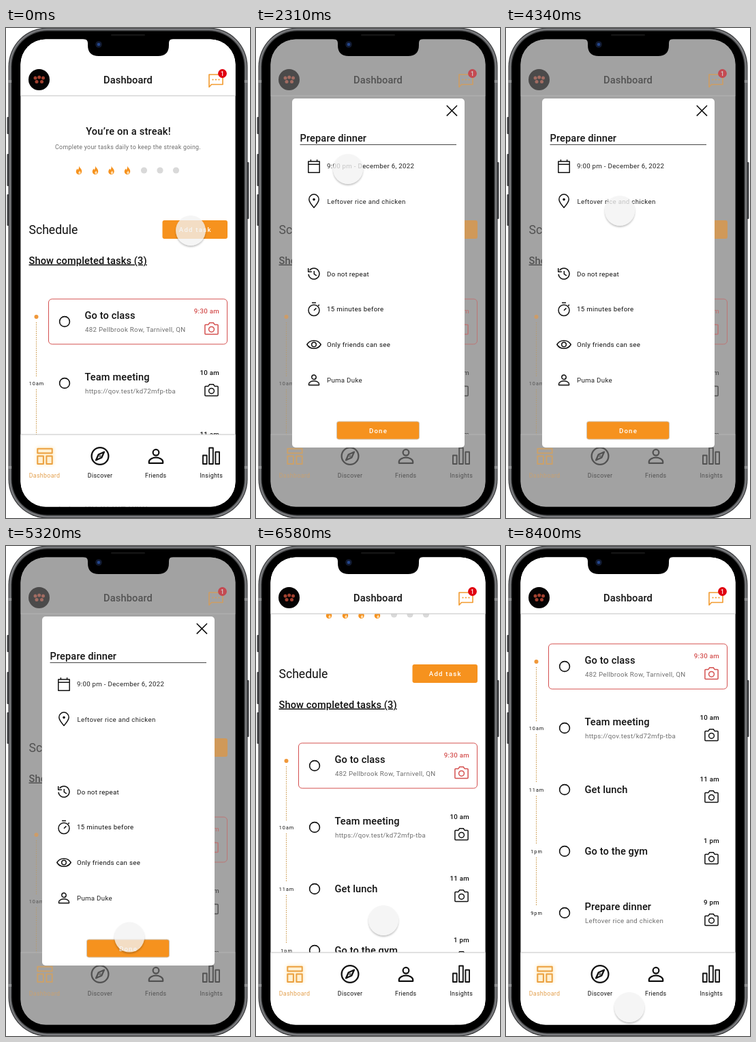
Write an HTML page that moves like this. It is 358x716 px and loops after 8470 ms.

```html
<!DOCTYPE html>
<html lang="en">
<head>
<meta charset="utf-8">
<title>Task planner</title>
<style>
  html, body { margin: 0; width: 100%; height: 100%; overflow: hidden; background: #fff; }
  svg { position: absolute; left: 0; top: 0; display: block; font-family: Roboto, sans-serif; }
  .paper { fill: #fff; }
  .dim .paper { fill: #a3a3a3; }
  .dim #ui { opacity: .55; }
  .dim .glow { display: none; }
  #touch {
    position: absolute; left: -22px; top: -22px; width: 44px; height: 44px; border-radius: 50%;
    background: rgba(242, 242, 242, .78); box-shadow: 0 2px 2.5px rgba(0, 0, 0, .23);
  }
</style>
</head>
<body>
<svg id="stage" width="358" height="716" viewBox="0 0 358 716"></svg>
<div id="touch"></div>
<script>
const LOOP = 8470, STEP = 70;
const ORANGE = '#f6921e', RED = '#d4504f', INK = '#111', GREY = '#6e6e6e';

// ---- drawing helpers ----
const text = (x, y, size, str, o = {}) =>
  `<text x="${x}" y="${y}" font-size="${size}" font-weight="${o.w || 400}" fill="${o.c || INK}" ` +
  `letter-spacing="${o.ls || 0}" text-anchor="${o.a || 'start'}"${o.u ? ' text-decoration="underline"' : ''}>${str}</text>`;
const rect = (x, y, w, h, r, fill, more = '') =>
  `<rect x="${x}" y="${y}" width="${w}" height="${h}" rx="${r}" fill="${fill}" ${more}/>`;
const paper = (x, y, w, h, r = 0, more = '') => rect(x, y, w, h, r, '#fff', `class="paper" ${more}`);
const disc = (x, y, r, fill, more = '') =>
  `<circle cx="${x}" cy="${y}" r="${r}" fill="${fill}" ${more}/>`;
const ring = (x, y, r) => `<circle cx="${x}" cy="${y}" r="${r}"/>`;
const line = (d, c, w = 1, more = '') =>
  `<path d="${d}" fill="none" stroke="${c}" stroke-width="${w}" ${more}/>`;
const icon = (x, y, c, w, body) =>
  `<g transform="translate(${x} ${y})" fill="none" stroke="${c}" stroke-width="${w}" stroke-linejoin="round">${body}</g>`;
const head = (x, y, str, c = INK) => text(x, y, 14.6, str, { w: 500, ls: .12, c });
const small = (x, y, str, c = INK) => text(x, y, 9.7, str, { ls: .3, c });
const button = (x, y, w, h, fill, str, c, more) =>
  rect(x, y, w, h, 3, fill, more) + text(x + w / 2 + .5, y + h / 2 + 3.5, 9.7, str, { w: 500, ls: 1.2, c, a: 'middle' });

// ---- scrolling page ----
const flame = x => `<g transform="translate(${x} 208)">
  <path fill="${ORANGE}" d="M-1-6.5c1 3 4 4 4.2 7.5c.2 3-1.8 5-4 5c-2.6 0-4.6-2-4.4-4.6c.1-1.8 1.2-2.6 1.6-4c.8.6 1 1.2 1.2 2c1.3-1.6 1.7-3.6 1.4-5.9z"/>
  <path fill="#ffe0b3" d="M0 .4c1 1.2 1.7 2 1.6 3.3c-.1 1.1-.8 1.7-1.7 1.7s-1.7-.7-1.6-1.9c.1-1.3 1.3-1.6 1.7-3.1z"/></g>`;

const camera = (y, c) => icon(301.5, y, c, 1.5,
  '<path d="M-8.6-5.6h4l1.8-2.6h5.6l1.8 2.6h4q1 0 1 1v12q0 1-1 1h-17.2q-1 0-1-1v-12q0-1 1-1z"/>' + ring(0, 1.3, 3.9));

const ROWS = [
  ['Go to class', '482 Pellbrook Row, Tarnivell, QN', '9:30 am', ''],
  ['Team meeting', 'https://qov.test/kd72mfp-tba', '10 am', '10am'],
  ['Get lunch', '', '11 am', '11am'],
  ['Go to the gym', '', '1 pm', '1pm'],
  ['Prepare dinner', 'Leftover rice and chicken', '9 pm', '9pm']
];

function row([title, sub, time, mark], i) {
  const y = 429 + i * 90, c = i ? INK : RED;
  let s = i ? '' : paper(62.5, 396, 262, 66, 5, `stroke="${RED}"`) + disc(44.5, 422, 3, '#f0983a');
  s += icon(86, y, INK, 1.6, ring(0, 0, 7.4));
  s += head(115.5, y + (sub ? -4 : 5), title) + small(116, y + 15, sub, GREY);
  s += text(313, y - 12, 9.7, time, { w: 500, ls: .3, c, a: 'end' }) + camera(y + 10, c);
  if (mark) s += text(45, y + 2.5, 7.3, mark, { ls: 1, a: 'middle' });
  if (i < 4) s += line(`M44.5 ${y + (i ? 9 : 1)}V${y + 80}`, '#c99545', 1.1, 'stroke-dasharray="1.5 1.6"');
  return s;
}

const page = () =>
  text(179.5, 156, 14.6, 'You’re on a streak!', { w: 500, ls: .2, a: 'middle' }) +
  text(179, 177, 8.9, 'Complete your tasks daily to keep the streak going.', { ls: .26, c: GREY, a: 'middle' }) +
  [108, 132, 155.5, 179].map(flame).join('') +
  [202.5, 226, 249.5].map(x => disc(x, 208, 4.6, '#d9d9d9')).join('') +
  text(33.5, 300.5, 17.6, 'Schedule') +
  button(229.5, 281, 95.5, 27, ORANGE, 'Add task', '#fff') +
  text(33.5, 344.5, 14.6, 'Show completed tasks (3)', { w: 500, ls: .12, u: 1 }) +
  ROWS.map(row).join('');

// ---- fixed bars ----
const header = () =>
  paper(21, 16, 316, 83) + line('M21 99H337', '#c2c2c2') +
  disc(48.5, 75.5, 15.5, '#050303') +
  [[43, 73], [48.7, 72], [54.5, 73], [45, 78.5], [52.5, 78.5]].map(([x, y]) => disc(x, y, 2.5, '#a3402f')).join('') +
  text(179, 80.5, 14.6, 'Dashboard', { w: 500, ls: .12, a: 'middle' }) +
  icon(308, 76, '#f29a2e', 1.6, '<path d="M-10-8h20v14.5h-16.5l-3.5 3.7z"/>') +
  [303.5, 308, 312.5].map(x => disc(x, 75.5, 1.1, '#f29a2e')).join('') +
  disc(317.5, 66.5, 6.4, '#e0000f') + text(317.5, 69.6, 8.5, '1', { w: 500, c: '#fff', a: 'middle' });

const person = (k, w) => `<g transform="scale(${k})" stroke-width="${w}">` + ring(0, -4.2, 3.2) +
  '<path d="M-7.5 7.2v-1.5c0-3 4.5-4.5 7.5-4.5s7.5 1.5 7.5 4.5v1.5z"/></g>';

const nav = () =>
  paper(21, 594, 316, 106) + line('M21 594H337', '#c2c2c2') +
  rect(44, 612, 27, 27, 4, '#fff0d2', 'class="glow" filter="url(#soft)"') +
  icon(57, 626, '#eba03f', 2, '<path d="M-10.7-11.3h21.4v6.6h-21.4zM-10.7-.6h8.6v11.6h-8.6zM2.4-.6h8.3v11.6h-8.3z"/>') +
  icon(138, 625.5, INK, 2.3, ring(0, 0, 12.4) + '<path d="M6-6L2.3 2.3L-6 6L-2.3-2.3z"/>' + ring(0, 0, .4)) +
  icon(220, 626, INK, 2.2, person(1.36, 1.65)) +
  icon(301, 626, INK, 1.9, '<path d="M-12-1.5h5.6v12.5h-5.6zM-2.8-12.5h5.6v23.5h-5.6zM6.4-6.5h5.6v17.5h-5.6z"/>') +
  ['Dashboard', 'Discover', 'Friends', 'Insights'].map((s, i) =>
    text(56.5 + i * 81.6, 657, 8.9, s, { ls: .3, c: i ? INK : '#e3a04e', a: 'middle' })).join('');

// ---- dialog ----
const ICONS = [
  [202, '<path d="M-8.2-7h16.4v16.2h-16.4zM-8.2-2.8h16.4M-4.6-9.7v2.7M4.6-9.7v2.7"/>'],
  [253, '<path d="M0 9.5c-5-5.6-7.2-9-7.2-12.2a7.2 7.2 0 0 1 14.4 0c0 3.2-2.2 6.6-7.2 12.2z"/>' + disc(0, -2.4, 1.8, INK, 'stroke="none"')],
  [359, '<path d="M-8 .8a8 8 0 1 0 1.7-5.7M-8.3-8v5.2h5.2M.3-4v4.6l3.6 2.2"/>'],
  [411, ring(0, 1.5, 8) + '<path d="M-3-9.4h6M0 1.8l3.4-3.4M6.2-5l1.6-1.6"/>'],
  [462.5, '<path d="M-10.2 0c4.6-7.8 15.8-7.8 20.4 0c-4.600 7.8-15.800 7.8-20.4 0z"/>' + ring(0, 0, 3.3)],
  [514.5, person(1, 1.5)]
];

function form(name, due, note, mate, c, done) {
  return head(64.5, 166.4, name, done ? INK : '#9b9b9b') +
    small(104, 205.2, due, c) + small(104.5, 256.5, note, c) + small(104, 518, mate, c) +
    button(118.5, 575, 121, 26, done ? ORANGE : '#ededed', 'Done', done ? '#fff' : INK, done ? 'stroke="#d0c3b2"' : '');
}

const dialog = () =>
  rect(53, 103, 253, 510, 5, '#fff') +
  line('M279.8 113.2l15.2 15.2M295 113.2l-15.2 15.2', INK, 1.6) + line('M64.5 170.5H294', '#333', .9) +
  ICONS.map(([y, d]) => icon(85, y, INK, 1.5, d)).join('') +
  small(104, 362.8, 'Do not repeat') + small(104, 414.3, '15 minutes before') + small(104, 466, 'Only friends can see') +
  `<g id="blank">${form('Task Name', 'Due date', 'Description', 'Accountability partner', GREY, false)}</g>` +
  `<g id="filled">${form('Prepare dinner', '9:00 pm - December 6, 2022', 'Leftover rice and chicken', 'Puma Duke', '#222', true)}</g>`;

// ---- phone ----
const shell = (inset, fill) => rect(3.5 + inset, inset - .5, 351 - 2 * inset, 717 - 2 * inset, 57 - inset, fill);
const body = () =>
  [[130, 25], [184, 47], [243, 46]].map(([y, h]) => rect(1.5, y, 4, h, 1, '#3c3d40')).join('') +
  rect(352.5, 196, 4, 83, 1, '#3c3d40') +
  shell(0, '#38393b') + shell(1.2, '#7b7c7f') + shell(3.6, '#4b4c4e') + shell(5, '#000') +
  [76, 640].map(y => rect(3.5, y, 4.5, 4, 0, '#8f9092') + rect(350, y, 4.5, 4, 0, '#8f9092')).join('') +
  rect(154, 9, 50, 2.5, 1.2, '#141414');
const notch = () =>
  '<path d="M113 15h132v1q-6 0-6 6v3q0 16-16 16h-87q-16 0-16-16v-3q0-6-7-6z"/>' +
  disc(136, 24, 4.8, '#111a30') + disc(136, 24, 2.3, '#24468c');

const $ = id => document.getElementById(id);
$('stage').innerHTML = `<defs>
  <clipPath id="screen"><rect x="21.4" y="16.4" width="315.2" height="683.2" rx="37"/></clipPath>
  <filter id="soft" x="-30%" y="-30%" width="160%" height="160%"><feGaussianBlur stdDeviation="2"/></filter></defs>
  ${body()}
  <g clip-path="url(#screen)">${paper(21, 16, 316, 684)}
    <g id="ui"><g id="page">${page()}</g>${header()}${nav()}</g>
    <g id="dialog">${dialog()}</g></g>
  ${notch()}<circle id="ripple" fill="#a8a8a8"/>`;

// ---- motion ----
// time, x, y: a repeated place is a rest
const PATH = [
  [0, 271, 296], [1470, 271, 296], [2310, 135, 206], [2940, 135, 206],
  [3220, 117, 181], [3430, 130, 177], [3640, 143, 186], [3850, 141, 202], [3920, 141, 203], [4060, 141, 203],
  [4340, 167, 267], [4480, 174, 270], [4620, 174, 270],
  [4970, 155, 400], [5460, 187, 600], [5950, 187, 600], [6090, 187, 547], [7420, 187, 547],
  [7630, 228, 515], [7770, 195, 468], [7980, 130, 505], [8190, 156, 573], [8260, 156, 573],
  [8330, 165, 622], [8400, 181, 674]
];
const SCROLL = [[6370, 0], [6440, 12], [6510, 48], [6580, 108], [6650, 195], [6720, 253]];
const RIPPLES = [[280, 210], [5460, 280]];

const same = (a, b) => a.slice(1).every((v, k) => v === b[k + 1]);

function slope(keys, i, k) {
  const a = keys[i - 1], p = keys[i], b = keys[i + 1];
  if (!a || !b || same(a, p) || same(p, b)) return 0;
  return (b[k] - a[k]) / (b[0] - a[0]);
}

// smooth curve through the keys, coming to a stop at each rest
function along(keys, t, k) {
  const last = keys.length - 1;
  if (t <= keys[0][0]) return keys[0][k];
  if (t >= keys[last][0]) return keys[last][k];
  const i = keys.findIndex(p => p[0] > t) - 1, a = keys[i], b = keys[i + 1];
  const d = b[0] - a[0], u = (t - a[0]) / d, v = 1 - u;
  return a[k] * v * v * (1 + 2 * u) + b[k] * u * u * (3 - 2 * u) +
    d * u * v * (slope(keys, i, k) * v - slope(keys, i + 1, k) * u);
}

const show = (id, on) => $(id).setAttribute('visibility', on ? 'inherit' : 'hidden');

function draw(now) {
  const t = Math.floor(now % LOOP / STEP) * STEP;
  const x = along(PATH, t, 1), y = along(PATH, t, 2);
  const open = t >= 630 && t < 5600;
  $('touch').style.transform = `translate(${x}px, ${y}px)`;
  $('page').setAttribute('transform', `translate(0 ${-along(SCROLL, t, 1)})`);
  $('stage').classList.toggle('dim', open);
  show('dialog', open);
  show('blank', t < 1540);
  show('filled', t >= 1540);

  const hit = RIPPLES.find(([t0, d]) => t > t0 && t < t0 + d);
  const p = hit ? (t - hit[0]) / hit[1] : 1;
  const ripple = $('ripple');
  ripple.setAttribute('cx', x);
  ripple.setAttribute('cy', y);
  ripple.setAttribute('r', 22 + 40 * (1 - (1 - p) ** 2));
  ripple.setAttribute('opacity', .45 * (1 - p));
}

const start = performance.now();
function tick() {
  draw(performance.now() - start);
  requestAnimationFrame(tick);
}
tick();
</script>
</body>
</html>
```
